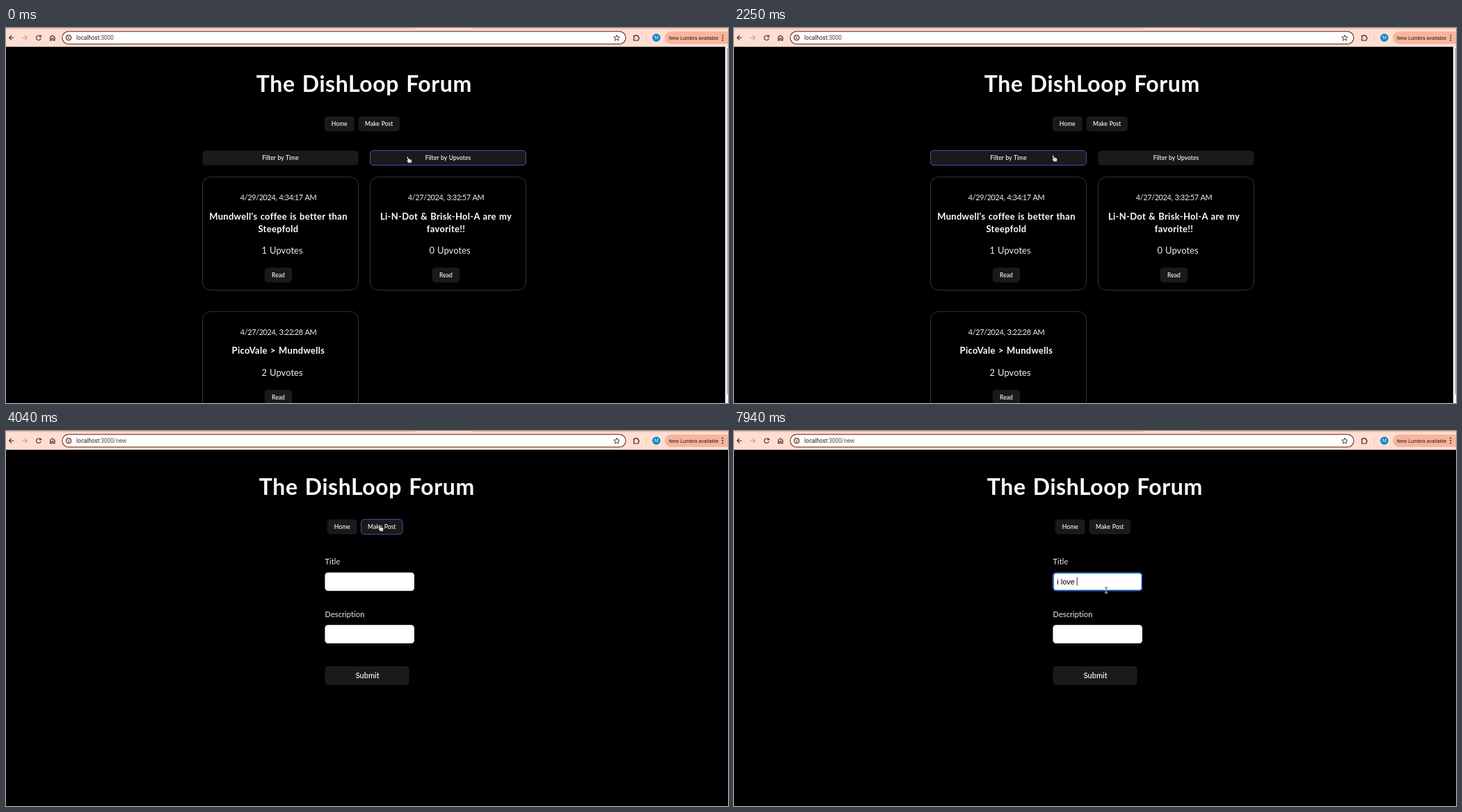
These frames come from a looping animation (1038 by 540 pixels, 8 s). An HTML page:

```html
<!DOCTYPE html>
<html lang="en">
<head>
<meta charset="utf-8">
<title>Forum demo</title>
<style>
  html, body { margin: 0; width: 100%; height: 100%; overflow: hidden; background: #000; }
  svg { display: block; font-family: Lato, "Open Sans", sans-serif; fill: #fff; }
  text { white-space: pre; word-spacing: .06em; }
  .mid { text-anchor: middle; }
  .h1 { font-size: 32px; font-weight: 700; letter-spacing: .55px; }
  .btn { font-size: 8.6px; font-weight: 500; }
  .date { font-size: 11px; letter-spacing: -.45px; fill: #eee; }
  .title { font-size: 13px; font-weight: 700; letter-spacing: .3px; }
  .votes { font-size: 13px; fill: #eee; }
  .label { font-size: 11px; letter-spacing: .1px; fill: #eee; }
  .submit { font-size: 11px; font-weight: 500; }
  .input { font: 11px "Liberation Sans", Arial, sans-serif; fill: #000; word-spacing: 0; }
  .ui { font-family: Roboto, sans-serif; word-spacing: 0; fill: #2b1d19; }
  .line { fill: none; stroke: #3a2a25; stroke-width: 1.1; }
</style>
</head>
<body>
<svg id="stage" width="1038" height="540" viewBox="0 0 1038 540"></svg>
<script>
const LOOP = 8000;
const stage = document.getElementById('stage');

const posts = {
  coffee: { date: '4/29/2024, 4:34:17 AM', title: ["Mundwell's coffee is better than", 'Steepfold'], votes: 1 },
  fav: { date: '4/27/2024, 3:32:57 AM', title: ['Li-N-Dot &amp; Brisk-Hol-A are my', 'favorite!!'], votes: 0 },
  taco: { date: '4/27/2024, 3:22:28 AM', title: ['PicoVale &gt; Mundwells'], votes: 2 }
};
const byTime = [posts.coffee, posts.fav, posts.taco];
const byVotes = [posts.taco, posts.coffee, posts.fav];

// time, x, y: the pointer holds each place until the next one
const pointer = [
  [0, 579.7, 190], [1650, 544.7, 190], [1800, 502, 189], [1950, 474, 188], [2100, 462, 188],
  [2250, 461, 188], [2700, 461.5, 188], [3150, 464, 180], [3300, 478, 167], [3450, 500, 155],
  [3600, 522, 146], [3740, 534, 141], [3890, 539, 140], [4340, 538, 147], [4490, 537, 165],
  [4640, 536, 190], [4790, 536, 212], [4940, 535, 222], [5090, 535, 227], [5240, 535, 229]
];
// time, typed text, caret x
const typing = [
  [0, '', 464.7], [6290, 'i', 467.2], [6440, 'i ', 470.3], [6740, 'i l', 472.7],
  [7190, 'i lo', 478.6], [7490, 'i lov', 484.2], [7640, 'i love', 490], [7940, 'i love ', 493.2]
];
const at = (keys, t) => keys.findLast(k => k[0] <= t);

const rect = (x, y, w, h, r, fill, more = '') =>
  `<rect x="${x}" y="${y}" width="${w}" height="${h}" rx="${r}" fill="${fill}" ${more}/>`;
const text = (x, y, cls, s, more = '') => `<text x="${x}" y="${y}" class="${cls}" ${more}>${s}</text>`;
const path = (d, more = 'class="line"') => `<path d="${d}" ${more}/>`;
const circle = (x, y, r, more) => `<circle cx="${x}" cy="${y}" r="${r}" ${more}/>`;

function button(x, y, w, h, label, mouse) {
  const over = mouse && mouse.x > x && mouse.x < x + w && mouse.y > y && mouse.y < y + h;
  if (over) mouse.kind = 'hand';
  return rect(x, y, w, h, 4.5, '#1a1a1a', over ? 'stroke="#5d64e8" stroke-width=".75"' : '') +
    text(x + w / 2, y + h / 2 + 3, 'btn mid', label);
}

function toolbar(url) {
  return rect(0, 0, 1038, 27, 0, '#ffded2') +
    rect(0, 0, 1038, 1.5, 0, '#f8b8a0') + rect(588, 0, 82, 1.5, 0, '#ffded2') +
    path('M11.5 14H4.8M8 10.6L4.6 14L8 17.4') +
    path('M23.5 14H30.2M27 10.6L30.4 14L27 17.4', 'class="line" style="stroke:#b99c92"') +
    path('M49.4 11.8A3.4 3.4 0 1 0 50.2 14.8M50.3 10.2V12.7H47.6') +
    path('M63.6 13.2L66.8 10.6L70 13.2V17.6H67.9V14.8H65.7V17.6H63.6Z') +
    rect(80.8, 4.8, 810.2, 18.4, 9.2, '#fff', 'stroke="#7b3f2d" stroke-width="1.2"') +
    circle(90, 14, 6.3, 'fill="#ffe9e1"') + circle(90, 14, 3.5, 'class="line"') +
    path('M90 13.6V16M90 11.9V12.8') +
    text(101, 17, 'ui', `localhost<tspan fill="#544640">:3000${url}</tspan>`, 'font-size="8.2"') +
    path('M878 10L879.2 12.8L882.2 13L879.9 15L880.6 18L878 16.4L875.4 18L876.1 15L873.8 13L876.8 12.8Z',
      'class="line" style="stroke-width:.9"') +
    path('M902.4 11.4H904.6A1.3 1.3 0 0 1 907.2 11.4H909V13.4A1.3 1.3 0 0 1 909 16V18H902.4V15.9A1.3 1.3 0 0 0 902.4 13.4Z') +
    rect(920, 9, 1, 10, 0, '#f6bda8') +
    circle(935, 14, 5.8, 'fill="#0b84c9"') +
    text(935, 16.4, 'ui mid', 'M', 'font-size="6.5" style="fill:#fff"') +
    rect(947, 5, 100, 18, 9, '#f7b59d') +
    text(953, 16.6, 'ui', 'New Lumbra available', 'font-size="7.3"') +
    [10.6, 14, 17.4].map(y => circle(1030.3, y, 1, 'fill="#3a2a25"')).join('');
}

const header = (dx, mouse) =>
  text(514.8 + dx, 91.8, 'h1 mid', 'The DishLoop Forum') +
  button(458 + dx, 127.3, 42.7, 21.4, 'Home', mouse) +
  button(506.5 + dx, 127.3, 59.5, 21.4, 'Make Post', mouse);

function card(post, i) {
  const short = post.title.length < 2;
  const x = 282.5 + i % 2 * 241;
  const y = i > 1 ? 408.3 : short ? 223.5 : 214.5;
  const lift = short ? 18 : 0;
  const mid = x + 109;
  return rect(x, y, 224, 163 - lift, 11.5, 'none', 'stroke="#444" stroke-width=".8"') +
    text(mid, y + 33.5, 'date mid', post.date) +
    post.title.map((s, n) => text(mid, y + 61 + n * 18, 'title mid', s)).join('') +
    text(mid + 5.5, y + 110.6 - lift, 'votes mid', post.votes + ' Upvotes') +
    button(mid - 19.7, y + 130.5 - lift, 39.4, 21.4, 'Read');
}

function listPage(sorted, mouse) {
  return header(0, mouse) +
    button(282.5, 176.5, 224, 21, 'Filter by Time', mouse) +
    button(523.5, 176.5, 224, 21, 'Filter by Upvotes', mouse) +
    (sorted ? byVotes : byTime).map(card).join('') +
    rect(1034, 27, 4, 513, 0, '#f8f8f8') +
    rect(1036, 28.5, 3, sorted ? 484 : 499, 1.5, '#c1c1c1');
}

function formPage(t, mouse) {
  const [, typed, caret] = at(typing, t);
  const focused = t >= 4940;
  const caretOn = focused && (t < 5240 || t >= 5840);
  if (mouse.y > 203 && mouse.y < 231) mouse.kind = 'beam';
  return header(4, mouse) +
    text(458.5, 192.3, 'label', 'Title') +
    rect(458.5, 203.7, 128.5, 26.5, 4.5, '#fff') +
    (focused ? rect(459.3, 204.5, 127, 25, 3.8, 'none', 'stroke="#0b5cd0" stroke-width="1.4"') : '') +
    text(464.3, 220.6, 'input', typed, 'xml:space="preserve"') +
    (caretOn ? rect(caret - .4, 210.5, .8, 12.3, 0, '#000') : '') +
    text(458.5, 268.2, 'label', 'Description') +
    rect(458.5, 279.3, 128.5, 26.5, 4.5, '#fff') +
    rect(458.5, 338.7, 121, 27, 4.5, '#1a1a1a') +
    text(519.7, 356, 'submit mid', 'Submit');
}

const shapes = {
  hand: path('M-3.2-4.4C-2.6-5-1.9-4.8-1.6-4.1L-.6-1.4L2.4-.8C3.4-.5 3.8.2 3.7 1.2L3.2 4.4H-1.1L-3.5 1.6C-4 .8-3.2.2-2.4.7L-1.9 1.1L-3.4-3.2Z',
    'fill="#fff" stroke="#111" stroke-width=".7"') +
    path('M.2 1V3M1.7 1V3', 'stroke="#333" stroke-width=".45"'),
  arrow: path('M-2.5-5V3.2L-.6 1.5L.6 4.3L1.8 3.8L.6 1.1H3.2Z', 'fill="#000" stroke="#fff" stroke-width=".8"'),
  beam: [['#fff', 1.8], ['#222', .8]].map(([c, w]) =>
    path('M-2-4Q0-4 0-2.8Q0-4 2-4M0-3V3M-2 4Q0 4 0 2.8Q0 4 2 4M-1.2 1H1.2',
      `fill="none" stroke="${c}" stroke-width="${w}"`)).join('')
};

let shown = '';
function draw(now) {
  const t = now % LOOP;
  const [, x, y] = at(pointer, t);
  const mouse = { x, y, kind: 'arrow' };
  const onForm = t >= 4040;
  const page = onForm ? formPage(t, mouse) : listPage(t >= 300 && t < 2250, mouse);
  const html = page + toolbar(onForm ? '/new' : '') +
    `<g transform="translate(${x} ${y})">${shapes[mouse.kind]}</g>`;
  if (html !== shown) stage.innerHTML = shown = html;
  requestAnimationFrame(draw);
}
draw(performance.now());
</script>
</body>
</html>
```
